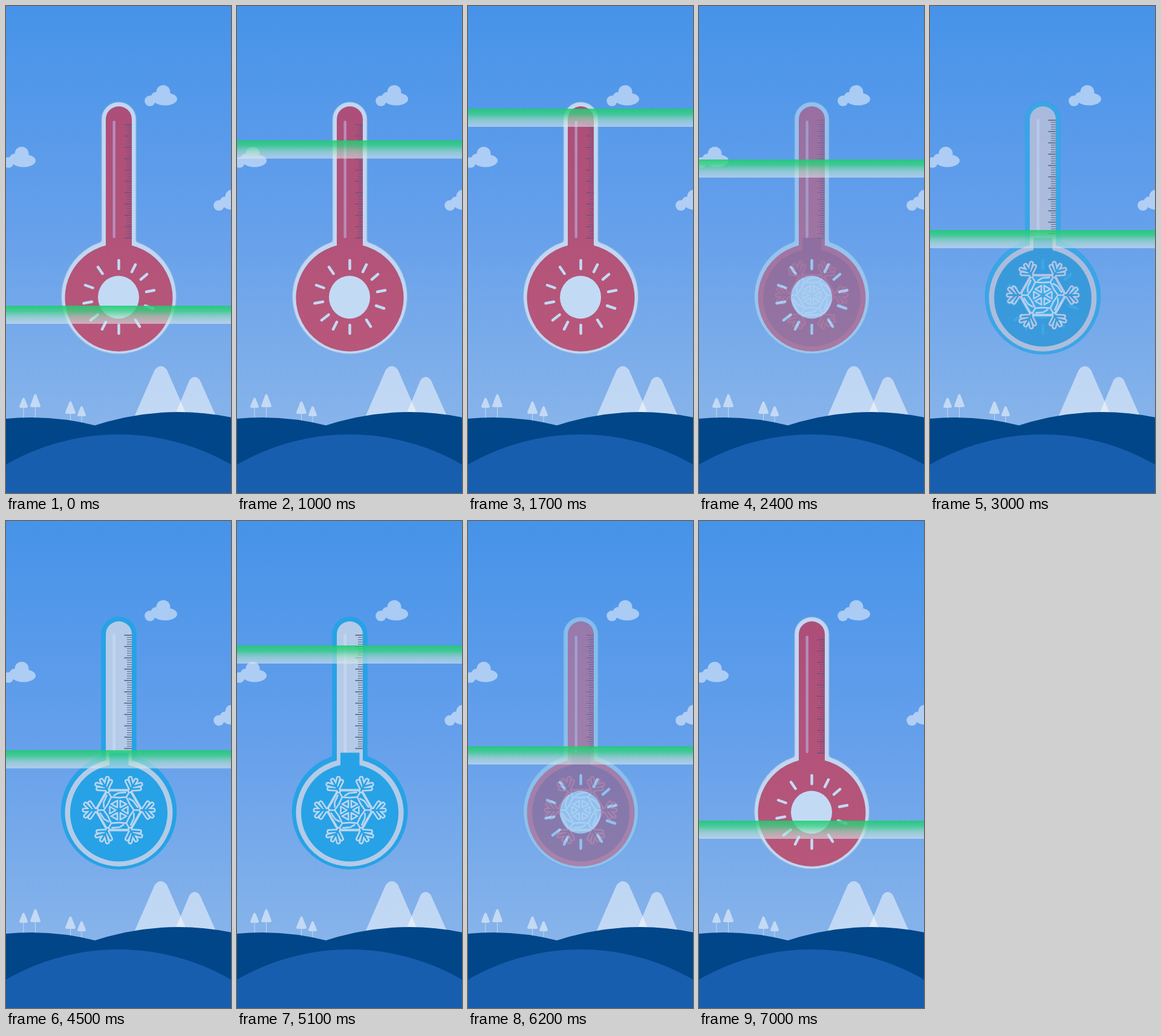
An HTML page that plays this animation: 372 by 806 pixels, repeating every 7.1 s.

```html
<!DOCTYPE html>
<html lang="en">
<head>
<meta charset="utf-8">
<title>Thermometer scan</title>
<style>
html, body { margin: 0; width: 100%; height: 100%; overflow: hidden; background: #4693e9; }
svg { display: block; width: 372px; height: 806px; }
</style>
</head>
<body>
<svg viewBox="0 0 372 806" xmlns="http://www.w3.org/2000/svg">
  <defs>
    <linearGradient id="sky" x1="0" y1="0" x2="0" y2="1">
      <stop offset="0" stop-color="#4693e9"/>
      <stop offset=".5" stop-color="#649feb"/>
      <stop offset="1" stop-color="#88b4ea"/>
    </linearGradient>
    <linearGradient id="heat" gradientUnits="userSpaceOnUse" x1="0" y1="160" x2="0" y2="575">
      <stop offset="0" stop-color="#ac4e78"/>
      <stop offset="1" stop-color="#b8577a"/>
    </linearGradient>
    <linearGradient id="beam" x1="0" y1="0" x2="0" y2="1">
      <stop offset="0" stop-color="#1ccd6e" stop-opacity=".88"/>
      <stop offset=".3" stop-color="#3bd283" stop-opacity=".78"/>
      <stop offset=".65" stop-color="#a9dfc8" stop-opacity=".64"/>
      <stop offset="1" stop-color="#e4e8f0" stop-opacity=".58"/>
    </linearGradient>
    <g id="cloud" fill="#fff">
      <circle cx="260" cy="142.500" r="11.500"/>
      <circle cx="238" cy="157" r="8.800"/>
      <circle cx="248" cy="151" r="8.500"/>
      <ellipse cx="263" cy="154" rx="20" ry="10.500"/>
    </g>
    <path id="shell" d="M158 187.500a28.500 28.500 0 0 1 57 0V387q0 3 3 4.300A95 95 0 1 1 155 391.300q3-1.300 3-4.300Z"/>
    <path id="bore" d="M165 187.500a21.500 21.500 0 0 1 43 0V396.300A89 89 0 1 1 165 396.300Z"/>
  </defs>

  <rect width="372" height="700" fill="url(#sky)"/>
  <use href="#cloud" opacity=".5"/>
  <use href="#cloud" opacity=".5" x="-234" y="102"/>
  <use href="#cloud" opacity=".5" x="114" y="173"/>

  <g fill="#fff" fill-opacity=".5">
    <path d="M212 680L246 602Q256 590 266 602L300 680Z"/>
    <path d="M278 680L303.500 619Q312 609 320.500 619L349 683Z"/>
  </g>
  <g id="trees" fill="#c3d9f4" stroke="#c3d9f4"></g>

  <path fill="#004689" d="M-68 695.300Q42 666.700 152 695.300V806H-68Z"/>
  <path fill="#004689" d="M140 696.300Q285 647.700 430 696.300V806H0V696Z"/>
  <circle cx="186" cy="1080" r="371" fill="#185eae"/>

  <g id="cold">
    <use href="#shell" fill="#27a2e6" stroke="#27a2e6" stroke-width="1.500"/>
    <use href="#bore" fill="#b3cbe8"/>
    <path d="M178.700 189V382" stroke="#c2d6f0" stroke-width="4.500" stroke-linecap="round"/>
    <g id="coldTicks" stroke="#53627f"></g>
    <circle cx="186.500" cy="483" r="80.500" fill="#27a2e6"/>
    <rect x="171" y="383.500" width="31.500" height="26" fill="#27a2e6"/>
    <g id="flake" transform="translate(186.500 478.500)" fill="none" stroke-linecap="round" stroke-linejoin="round"></g>
  </g>

  <g id="hot">
    <use href="#shell" fill="#c0d7f3" stroke="#8fb2dd" stroke-width="1.200"/>
    <use href="#bore" fill="url(#heat)"/>
    <path d="M178.700 192V382" stroke="#b68cba" stroke-width="4.500" stroke-linecap="round"/>
    <g id="hotTicks" stroke="#6d527c"></g>
    <ellipse cx="186" cy="482" rx="34" ry="35.500" fill="#c3daf5"/>
    <path stroke="#c3daf5" stroke-width="4.500" stroke-linecap="round" d="M186.500 421v14M214 428l-6 12M233 444l-10 8.500M245 470.500l-13 2.500M243 500.500l-13-4.500M221 530.500l-7-11M186.500 528v14M159 535l6-12M140 520l11.500-9M128.500 492l13.500-2.500M131 462l12.500 4.500M152 432l7.500 11"/>
  </g>

  <rect id="bar" width="372" height="30" fill="url(#beam)"/>
</svg>
<script>
const LOOP = 7100, STEP = 100;
const $ = id => document.getElementById(id);

function tree(x, top, bottom, half, ground) {
  const b = bottom - 2.5;
  return `<path stroke="none" d="M${x - 2} ${top + 2}q2-3.500 4 0L${x + half} ${b}q0 2.500-2.500 2.500H${x - half + 2.5}q-2.500 0-2.500-2.500Z"/>` +
    `<path d="M${x} ${bottom}V${ground}"/>`;
}
$('trees').innerHTML = tree(29, 648, 665, 7, 684) + tree(48.5, 642, 664, 8.5, 685) +
  tree(106.5, 654, 675, 8.5, 689) + tree(125, 662, 679, 7, 691);

function ticks(top) {
  let out = '';
  for (let i = 0; i <= 50; i++) {
    const major = i % 5 === 0;
    out += `<path stroke-width="${major ? 1.6 : 1}" d="M${major ? 195.5 : 200} ${top + i * 3.75}H208"/>`;
  }
  return out;
}
$('coldTicks').innerHTML = ticks(189);
$('hotTicks').innerHTML = ticks(196.5);

function flake() {
  const pale = '#bcd5f0', blue = '#27a2e6';
  const fronds = 'M37 0H57M40 0L48 12M45 0L55 10M40 0L48-12M45 0L55-10';
  const star = 'M5 0L15 6V-6ZM18 10L25 0L18-10M25 0H38M31-5L24-15L17-19';
  const ring = 'M38 0L19 32.900';
  let out = '';
  const layer = (d, color, width) => {
    for (let a = 0; a < 360; a += 60)
      out += `<path transform="rotate(${a})" d="${d}" stroke="${color}" stroke-width="${width}"/>`;
  };
  layer(fronds, pale, 8);
  layer(ring, pale, 4);
  layer(star, pale, 2.6);
  layer(fronds, blue, 2.8);
  return out;
}
$('flake').innerHTML = flake();

// Beam positions as [time, y]; straight runs between turns.
const path = [[0, 496], [1000, 222.5], [1320, 138], [1600, 158], [2400, 254], [3910, 548],
  [4100, 495], [5100, 206], [5350, 134], [6200, 373], [6820, 548], [7000, 496]];

function along(t) {
  for (let i = 1; i < path.length; i++) {
    const [t0, y0] = path[i - 1], [t1, y1] = path[i];
    if (t <= t1) return y0 + (y1 - y0) * (t - t0) / (t1 - t0);
  }
  return path[path.length - 1][1];
}
const ramp = (t, from, to) => Math.min(1, Math.max(0, (t - from) / (to - from)));

function draw(ms) {
  const t = Math.floor(ms % LOOP / STEP) * STEP;
  const cold = ramp(t, 2000, 3100) - ramp(t, 5600, 6700);
  $('cold').setAttribute('opacity', cold);
  $('hot').setAttribute('opacity', 1 - cold);
  $('bar').setAttribute('y', along(t));
}

let start;
function tick(now) {
  if (start === undefined) start = now;
  draw(now - start);
  requestAnimationFrame(tick);
}
draw(0);
requestAnimationFrame(tick);
</script>
</body>
</html>
```
